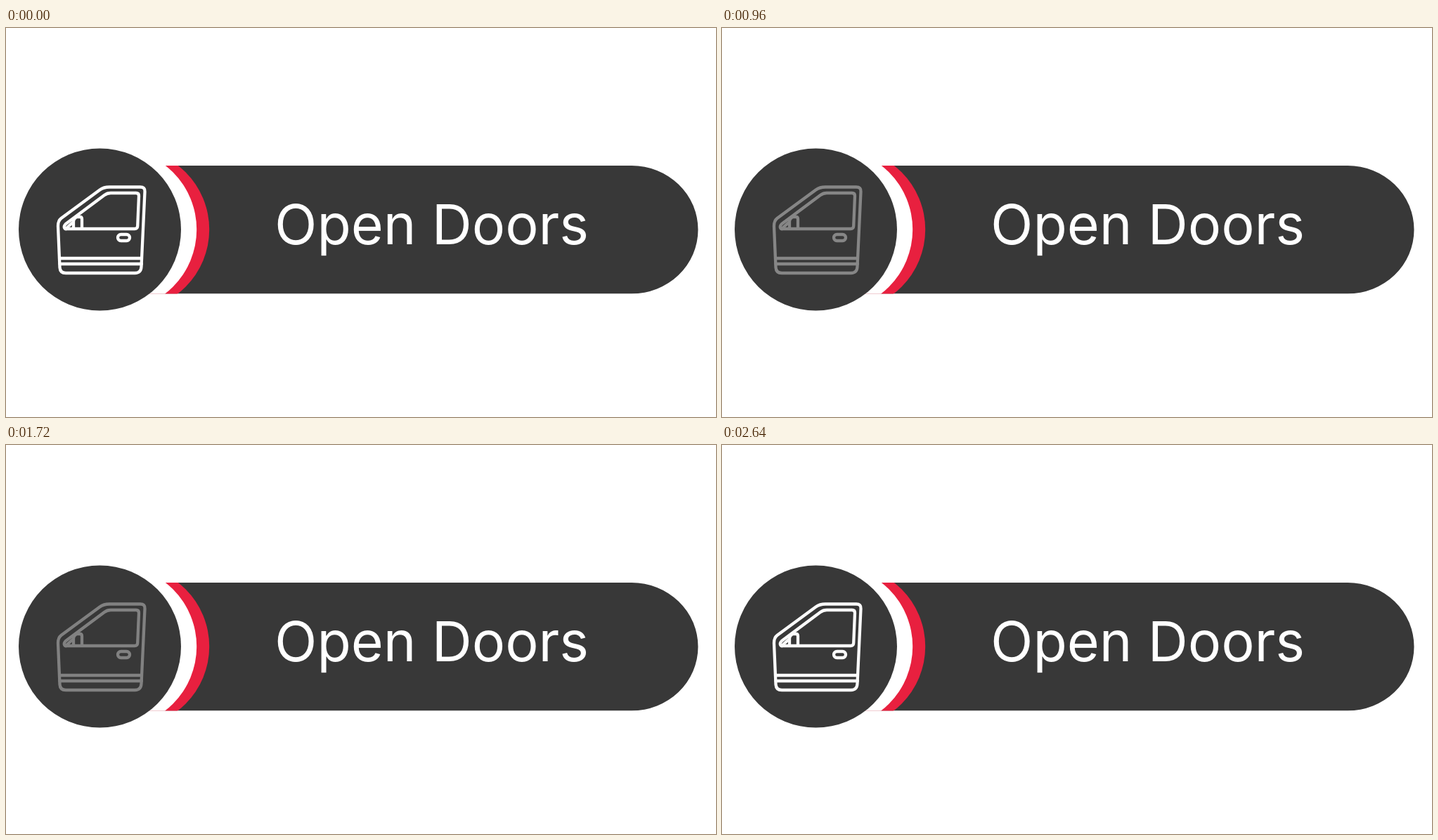
An HTML page without scripts that plays this animation: 1010x554 px, repeating every 2680 ms.

```html
<!DOCTYPE html>
<html lang="en">
<head>
<meta charset="utf-8">
<title>Open Doors</title>
<style>
  html, body { margin: 0; width: 100%; height: 100%; overflow: hidden; background: #fff; }
  svg { display: block; width: 100%; height: 100%; }
  .dark { fill: #383838; }
  .label { font: 400 79px Inter, Roboto, sans-serif; fill: #fff; text-anchor: middle; }
  .door {
    fill: none; stroke: #fff; stroke-width: 4.3;
    stroke-linecap: round; stroke-linejoin: round;
    animation: pulse 2680ms cubic-bezier(.4, .06, .6, .94) infinite;
  }
  @keyframes pulse {
    0%, 1.5%, 100% { opacity: 1; }
    25%, 74.2% { opacity: 0; }
    50.2% { opacity: 1; }
  }
</style>
</head>
<body>
<svg viewBox="0 0 1010 554">
  <defs>
    <clipPath id="band"><rect x="133" y="196" width="852" height="182.500"/></clipPath>
  </defs>
  <g clip-path="url(#band)">
    <path class="dark" d="M200 196H890A94.500 91.250 0 0 1 890 378.500H200Z"/>
    <circle cx="173.700" cy="287" r="115.5" fill="#e8203f"/>
    <rect x="133" y="196" width="93.800" height="182.500" fill="#fff"/>
    <circle cx="155.700" cy="287" r="115.5" fill="#fff"/>
  </g>
  <circle class="dark" cx="133.5" cy="287" r="115.5"/>
  <g class="door">
    <path d="M74 282Q74 274.500 78.500 271L133.500 230.500Q139 226.500 147 226.500H191Q198 226.500 197.500 233L192.500 340Q192 349 183.500 349H85Q77 349 76.500 341Z"/>
    <path d="M86 286H183Q187 286 187.200 282L189 239Q189 235 185 235H149Q144 235 140 238L85 279Q82 282 83 284.500T86 286Z"/>
    <path d="M96 285V275Q97 270 102 269H105Q108 269 108 272V285M87 284L96 276"/>
    <rect x="159" y="294" width="17" height="9" rx="4.500"/>
    <path d="M76 328H193M76.500 336H193"/>
  </g>
  <text class="label" x="605.500" y="308">Open Doors</text>
</svg>
</body>
</html>
```
